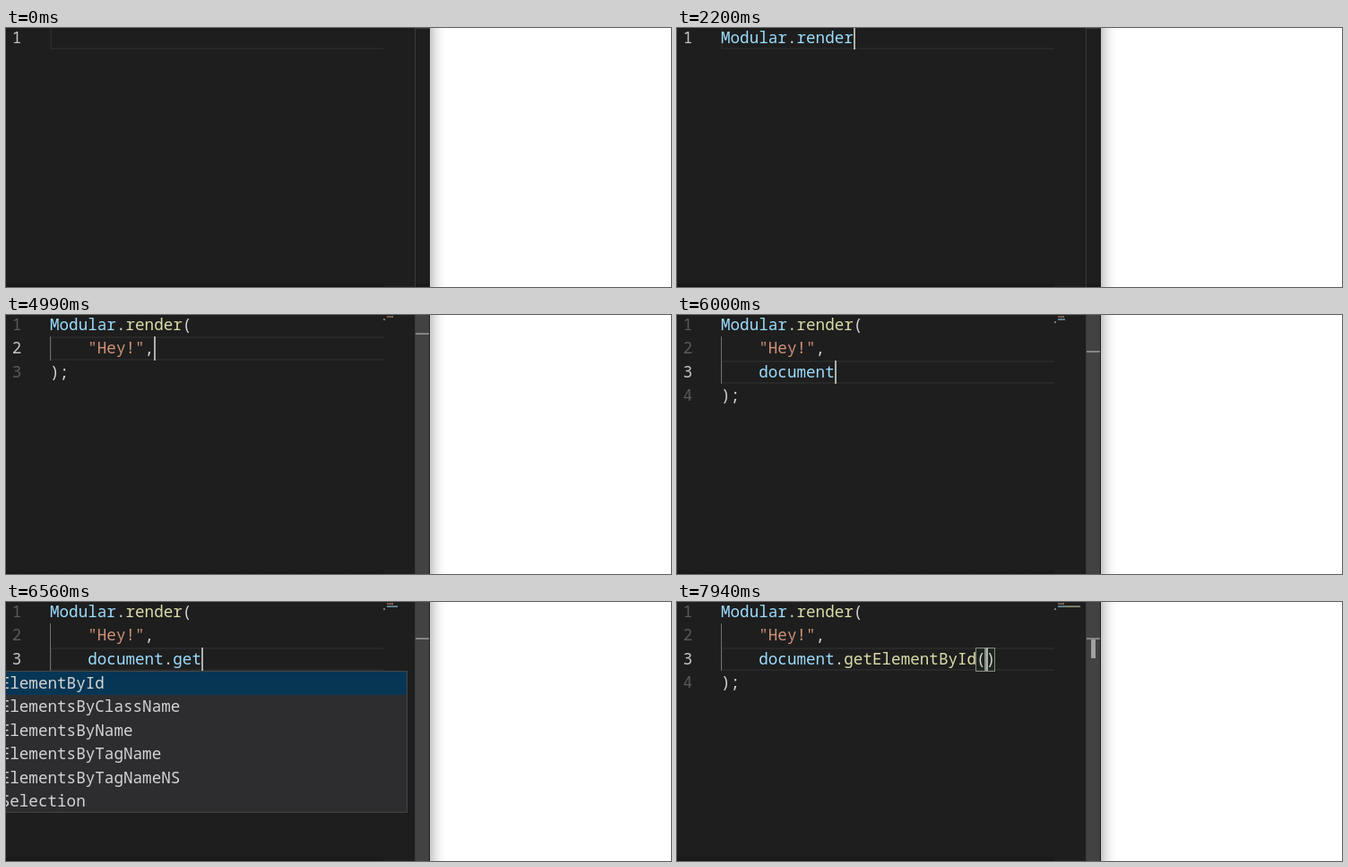
Animation of 742 by 290 pixels, one loop 7990 ms. Source, as an HTML page with a canvas:

```html
<!DOCTYPE html>
<html lang="en">
<head>
<meta charset="utf-8">
<title>Code editor</title>
<style>
  html, body { margin: 0; width: 742px; height: 290px; overflow: hidden; background: #fff; }
  canvas { display: block; }
</style>
</head>
<body>
<canvas id="stage" width="742" height="290"></canvas>
<script>
const ctx = document.getElementById("stage").getContext("2d");
const LOOP = 7990, CHAR = 10.56, LINE = 26.5, LEFT = 49;
const FONT = '17.6px "Noto Sans Mono", monospace';
const BLUE = "#9cdcfe", YELLOW = "#dcdcaa", STRING = "#ce9178", PLAIN = "#d4d4d4";

const DOT_LIST = ["execCommand", "execCommandShowHelp", "exitFullscreen", "exitPointerLock",
  "fgColor", "firstChild", "firstElementChild", "focus"];
const GET_LIST = ["getElementById", "getElementsByClassName", "getElementsByName",
  "getElementsByTagName", "getElementsByTagNameNS", "getSelection"];

const lineTop = i => Math.round(i * LINE - 2.5);

function rect(x, y, w, h, color) {
  ctx.fillStyle = color;
  ctx.fillRect(x, y, w, h);
}

function frame(x, y, w, h, color) {
  ctx.strokeStyle = color;
  ctx.lineWidth = 1;
  ctx.strokeRect(x + 0.5, y + 0.5, w - 1, h - 1);
}

// Draws on the fixed character grid.
function text(str, x, y, color, bold = false) {
  ctx.font = (bold ? "bold " : "") + FONT;
  ctx.fillStyle = color;
  [...str].forEach((ch, i) => ctx.fillText(ch, x + i * CHAR, y));
}

function gradient(x0, y0, x1, y1, ...stops) {
  const g = ctx.createLinearGradient(x0, y0, x1, y1);
  stops.forEach((c, i) => g.addColorStop(i / (stops.length - 1), c));
  return g;
}

// The part of str typed at time t, first key at start, last key at end.
function typed(str, t, start, end = start) {
  if (t < start) return "";
  if (t >= end) return str;
  return str.slice(0, 1 + Math.floor((t - start) * (str.length - 1) / (end - start)));
}

function editorState(t) {
  const call = typed("Modular.r", t, 410, 1370) + typed("ender(", t, 1650, 2250);
  const close = typed(")", t, 2250) + typed(";", t, 2570);
  if (t < 3160) {
    const shift = t < 2520 ? 0 : t < 2570 ? 1 : t < 2840 ? 2 : t < 3000 ? 1 : 0;
    const match = t >= 2250 && shift < 2;
    return { lines: [call + close], row: 0, col: call.length + shift,
      brackets: match ? [[0, 14], [0, 15]] : [], marks: match ? [[0, 20]] : [] };
  }
  let quoted = "    " + typed('"', t, 3440) + typed("Hey", t, 3800, 4170) + typed("!", t, 4490);
  const col = quoted.length + (t >= 4630) + (t >= 4990);
  quoted += typed('"', t, 3440) + typed(",", t, 4990);
  if (t < 5130) {
    const match = t < 3440;
    return { lines: [call, quoted, close], row: 1, col,
      brackets: match ? [[0, 14], [2, 0]] : [], marks: match ? [[0, 20], [44, 23]] : [] };
  }
  const lookup = "    " + typed("document", t, 5240, 6000) + typed(".", t, 6140) +
    typed("getElem", t, 6290, 6940) + typed("entById", t, 7580) + typed("(", t, 7940);
  const match = t >= 7940;
  return { lines: [call, quoted, lookup + typed(")", t, 7940), close], row: 2, col: lookup.length,
    brackets: match ? [[2, 27], [2, 28]] : [], marks: match ? [[42, 21]] : [] };
}

function tokens(line) {
  return [...line.matchAll(/"[^"]*"|\w+|[^\s\w"]/g)].map(({ 0: word, index }) => {
    const color = word[0] === '"' ? STRING
      : !/\w/.test(word) ? PLAIN
      : line[index + word.length] === "(" ? YELLOW : BLUE;
    return { word, index, color };
  });
}

function drawRuler(t, { row, marks }) {
  rect(456, 0, 1, 290, "#3a3a3a");
  ctx.globalAlpha = Math.max(0, Math.min(1, (t - 3160) / 200));
  rect(457, 0, 15, 290, "#424242");
  ctx.globalAlpha = 1;
  rect(457, row * 20, 15, row ? 2 : 1, row ? "#858585" : "#3a3a3a");
  marks.forEach(([y, h]) => rect(462, y, 5, h, "#a0a0a0"));
}

function drawCode(t, state) {
  const { lines, row, col, brackets } = state;
  const top = lineTop(row), bottom = lineTop(row + 1);
  ctx.strokeStyle = "#282828";
  ctx.lineWidth = 2;
  ctx.strokeRect(50, top + 1, 380, bottom - top - 2);
  rect(421, 0, 35, 290, "#1e1e1e");

  if (t >= 3440) rect(49, 24, 1, lineTop(row + 1) - 24, "#707070");
  brackets.forEach(([r, c]) => {
    const x = Math.round(LEFT + c * CHAR) - 1, y = lineTop(r);
    rect(x, y, 11, 27, "rgba(0,100,0,.1)");
    frame(x, y, 11, 27, "#888");
  });
  lines.forEach((line, i) => {
    const y = Math.round(17 + i * LINE - 0.1);
    text(String(i + 1), 6.8, y, i === row ? "#c6c6c6" : "#5a5a5a");
    tokens(line).forEach(({ word, index, color }) => {
      text(word, LEFT + index * CHAR, y, color);
      if (i) {
        ctx.globalAlpha = 0.5;
        rect(421 + index, i * 3 - 2, word.length, 2, color);
        ctx.globalAlpha = 1;
      }
    });
  });
  if (t >= 90 && !(t >= 7440 && t < 7580))
    rect(Math.round(LEFT + col * CHAR), top, 2, bottom - top, "#aeafad");
}

function drawPopup(top, items, { selected = true, match = 0, details = false } = {}) {
  const rowY = i => Math.round(top + i * 26.4);
  const height = details ? 300 : rowY(items.length) - top + 1;
  rect(0, top, 448, height, "#2d2d30");
  if (selected) rect(0, top, 447, 27, "#073655");
  items.forEach((item, i) => {
    const y = rowY(i) + 20;
    text(item.slice(0, match), -38, y, "#0097fb", true);
    text(item.slice(match), -38 + match * CHAR, y, PLAIN);
  });
  if (details) {
    text("(method) Document.getElement…", 129, top + 20, "#8b9fac");
    rect(0, 208, 448, 1, "#454545");
    text("(method) Document.getElementById(elementId: s", -61, 233, "#a0a0a0");
    text("tring): HTMLElement", -61, 259, "#a0a0a0");
    text("×", 422.5, 229, "#c5c5c5", true);
  }
  frame(-2, top, 450, height, "#454545");
}

function draw(t) {
  const state = editorState(t);
  rect(0, 0, 742, 290, "#fff");
  rect(473, 0, 18, 290, gradient(473, 0, 491, 0, "#c6c6c6", "#e4e4e4", "#f7f7f7", "#fff"));
  rect(0, 0, 473, 290, "#1e1e1e");
  rect(0, 284, 473, 6, gradient(0, 284, 0, 290, "#1e1e1e", "#191516"));
  drawRuler(t, state);
  drawCode(t, state);

  if (t >= 1250 && t < 1420) drawPopup(24, ["Modular"]);
  if (t >= 6140 && t < 7580) {
    const match = typed("getElem", t, 6290, 6940).length;
    if (!match) drawPopup(77, DOT_LIST, { selected: false });
    else drawPopup(77, match > 3 ? GET_LIST.slice(0, 5) : GET_LIST, { match, details: t >= 7080 });
  }
}

function tick() {
  draw(performance.now() % LOOP);
  requestAnimationFrame(tick);
}
tick();
</script>
</body>
</html>
```
